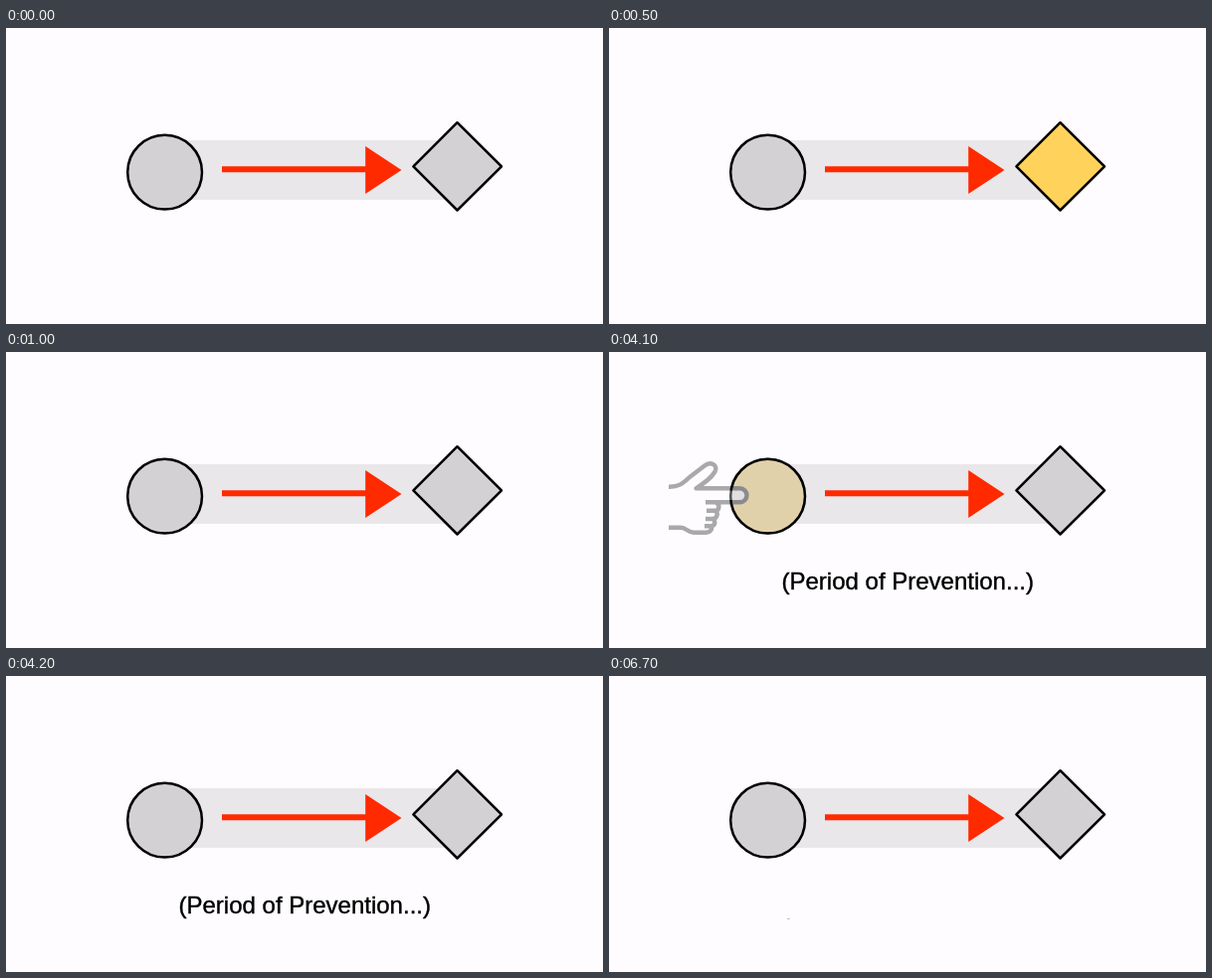
These frames come from a looping animation (600x298 px, 8 s). An HTML page:

```html
<!DOCTYPE html>
<html lang="en">
<head>
<meta charset="utf-8">
<style>
  html, body { margin: 0; width: 100%; height: 100%; overflow: hidden; background: #fefcff; }
  svg { display: block; width: 100vw; height: 100vh; }
  text { font: 24px "Liberation Sans", Arial, sans-serif; stroke: #000; stroke-width: 0.4; }
  .node { fill: #d3d1d3; stroke: #000; stroke-width: 2.5; stroke-linejoin: round; }
  .lit { fill: #ffd25b; }
  .hand { fill: none; stroke: #000; stroke-width: 4.4; stroke-linejoin: round; }
</style>
</head>
<body>
<svg viewBox="0 0 600 298">
  <path fill="#e9e7ea" d="M160 113H453V173H160Z"/>
  <path fill="#ff2a00" d="M217 139.200H361.200V119L397.500 143L361.200 167V145.200H217Z"/>
  <circle class="node" cx="159.600" cy="145.200" r="37.400"/>
  <path id="diamond" class="node" d="M453.500 95.200L498 139.300L453.500 183.500L409.400 139.300Z"/>
  <g id="press">
    <circle class="node lit" cx="159.600" cy="145.200" r="37.400"/>
    <path fill="#fefcff" d="M96 137.500H130.500a7 7 0 0 1 0 14H96Z"/>
    <path class="hand" d="M60 135.800C71 136 75 131.500 81 126L96 114.500C102 109.500 110 114 106.500 120.500C102 128 95 132.500 87.500 137.300H131.500a7 7 0 0 1 0 14H97
      M107 151.500C112 153 111.500 159.800 106 159.800H98
      M106 159.800C110.500 161.500 109 168 104 168H97
      M104 168C108 170.500 106.500 175.300 102 175.300H96
      M102 175.300C104.500 178 102 181.800 97 181.800H85C79 181.800 78 176.800 72 176.800H60"/>
  </g>
  <text id="label" x="173.500" y="238.500">(Period of Prevention...)</text>
</svg>
<script>
  const get = id => document.getElementById(id);
  const diamond = get("diamond"), press = get("press"), label = get("label");
  const between = (t, from, to) => t >= from && t < to;

  // The press fades out in three hard steps from 4000 to 4200 ms.
  function pressOpacity(t) {
    if (!between(t, 3700, 4200)) return 0;
    return t < 4000 ? 1 : t < 4100 ? 0.67 : 0.33;
  }

  function draw() {
    const t = performance.now() % 8000;
    diamond.classList.toggle("lit", between(t, 500, 1000));
    press.style.opacity = pressOpacity(t);
    label.style.opacity = between(t, 3700, 6700) ? 1 : 0;
    requestAnimationFrame(draw);
  }
  draw();
</script>
</body>
</html>
```
